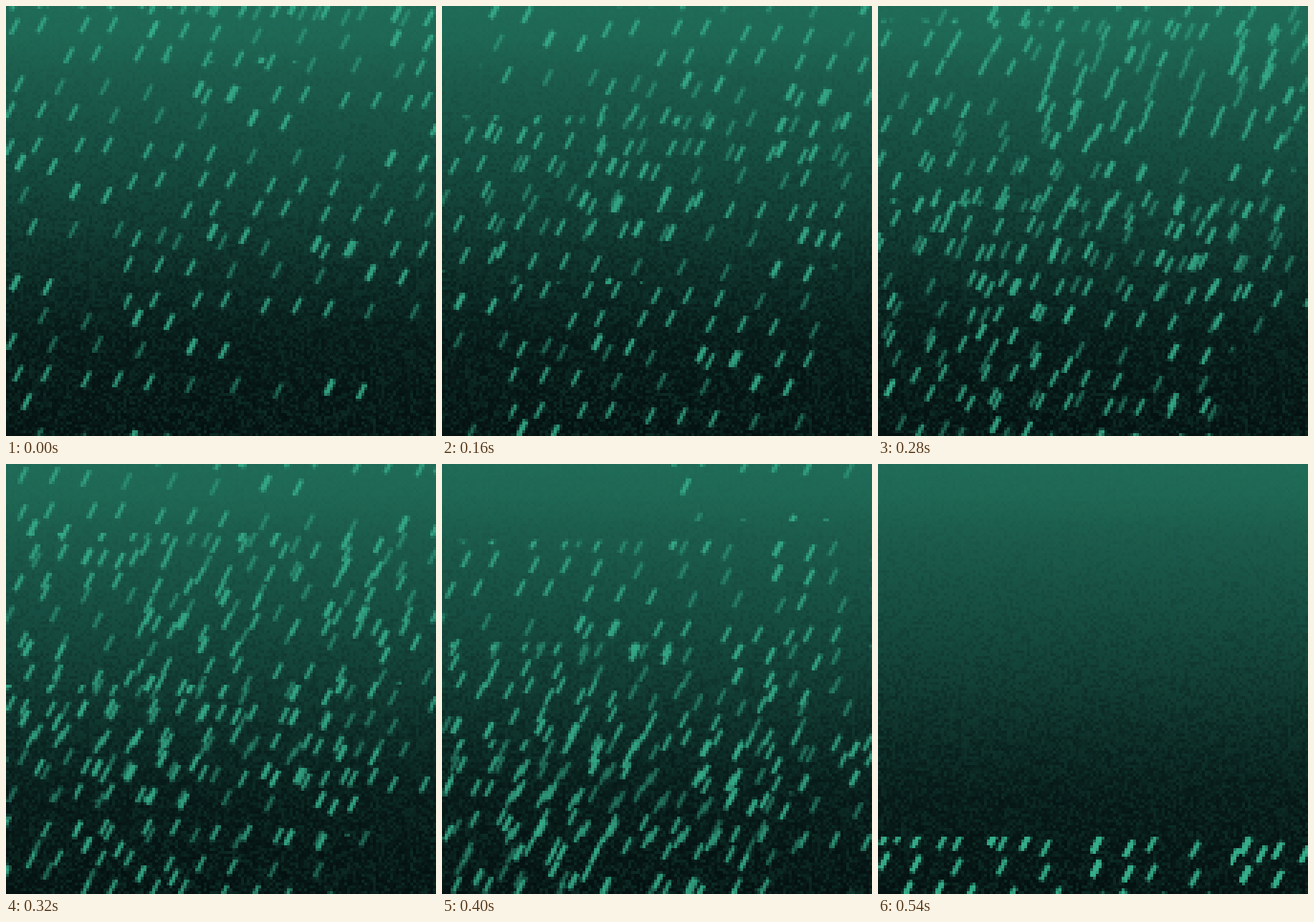
An HTML page with a canvas that plays this animation: 600x600 px, repeating every 0.56 s.

```html
<!DOCTYPE html>
<html lang="en">
<head>
<meta charset="utf-8">
<title>Pixel rain</title>
<style>
  html, body { margin: 0; width: 100%; height: 100%; overflow: hidden; background: #071715; }
  canvas { display: block; width: 600px; height: 600px; image-rendering: pixelated; }
</style>
</head>
<body>
<canvas id="stage" width="150" height="150"></canvas>
<script>
const ctx = document.getElementById('stage').getContext('2d');
const SIZE = 600, CELL = 4, STEP = 20, STEPS = 28;

// One row of drops: x, y, line width, opacity
const ROW = [
  [-193, -5, 6, .8], [-155, -8, 6, .8], [-95, -8, 6, .8], [-56, -8, 6, .8],
  [0, 0, 6, .8], [44, 0, 6, .8], [88, 4, 6, .8], [145, 8, 6, .5],
  [208, 8, 6, .5], [268, 16, 6, .5], [339, 11, 7.5, .9], [384, 17, 6.5, .9]
];
const GROUP = [[0, 0], [76, 40], [268, 97]];

// Each sheet part is clipped to a box and holds groups and single rows
const PARTS = [
  { box: [0, 0, 600, 600],
    groups: [[205, 34], [-70, 105], [-319, 207], [370, 250], [-156, 424], [-594, 278], [-431, 495]],
    rows: [[206, 0], [62, -10]] },
  { box: [165, 0, 435, 600], groups: [[94, 321]], rows: [] },
  { box: [570, 0, 630, 212], groups: [[414, 42], [139, 113]], rows: [[414, 2]] },
  { box: [732, 0, 270, 212], groups: [], rows: [[930, 33]] }
];

// Travel per step of each rain layer; all meet at the end of the loop
const LAYERS = [[8.89, 19.26], [15.45, 38.52], [23.4, 59], [78.7, 148.6]];
const END = [-240, 520];

function makeBackground() {
  const c = document.createElement('canvas');
  c.width = c.height = SIZE / CELL;
  const g = c.getContext('2d');
  const fade = g.createLinearGradient(0, 0, 0, c.height);
  [[0, '#206c58'], [.07, '#1f6955'], [.15, '#1d5f4e'], [.35, '#174e42'],
   [.5, '#133f35'], [.65, '#0d2c26'], [.78, '#091e1b'], [1, '#071715']]
    .forEach(([at, color]) => fade.addColorStop(at, color));
  g.fillStyle = fade;
  g.fillRect(0, 0, c.width, c.height);
  let seed = 7;
  const random = () => (seed = seed * 16807 % 2147483647) / 2147483647;
  for (let y = 0; y < c.height; y++) {
    const grain = .02 + .5 * Math.pow(y / c.height, 1.4);
    for (let x = 0; x < c.width; x++) {
      const r = random() * 2 - 1;
      g.fillStyle = r < 0 ? `rgba(2,10,12,${-r * grain})` : `rgba(32,106,86,${r * grain * .5})`;
      g.fillRect(x, y, 1, 1);
    }
  }
  return c;
}

function drawRow(x, y) {
  for (const [dx, dy, width, alpha] of ROW) {
    ctx.lineWidth = width;
    ctx.globalAlpha = alpha;
    ctx.beginPath();
    ctx.moveTo(x + dx + 5.5, y + dy - 11);
    ctx.lineTo(x + dx - 5.5, y + dy + 11);
    ctx.stroke();
  }
}

function drawLayer(x, y) {
  if (y > SIZE || y < -SIZE) return;
  for (const { box, groups, rows } of PARTS) {
    ctx.save();
    ctx.translate(x, y);
    ctx.beginPath();
    ctx.rect(...box);
    ctx.clip();
    for (const [gx, gy] of groups)
      for (const [rx, ry] of GROUP) drawRow(gx + rx, gy + ry);
    for (const [rx, ry] of rows) drawRow(rx, ry);
    ctx.restore();
  }
}

const background = makeBackground();
const start = performance.now();

function frame() {
  const step = Math.floor((performance.now() - start) / STEP) % STEPS;
  const left = STEPS - 1 - step;
  ctx.setTransform(1, 0, 0, 1, 0, 0);
  ctx.globalAlpha = 1;
  ctx.drawImage(background, 0, 0);
  ctx.scale(1 / CELL, 1 / CELL);
  ctx.strokeStyle = '#36ad8b';
  for (const [vx, vy] of LAYERS) drawLayer(END[0] + vx * left, END[1] - vy * left);
  requestAnimationFrame(frame);
}
frame();
</script>
</body>
</html>
```
